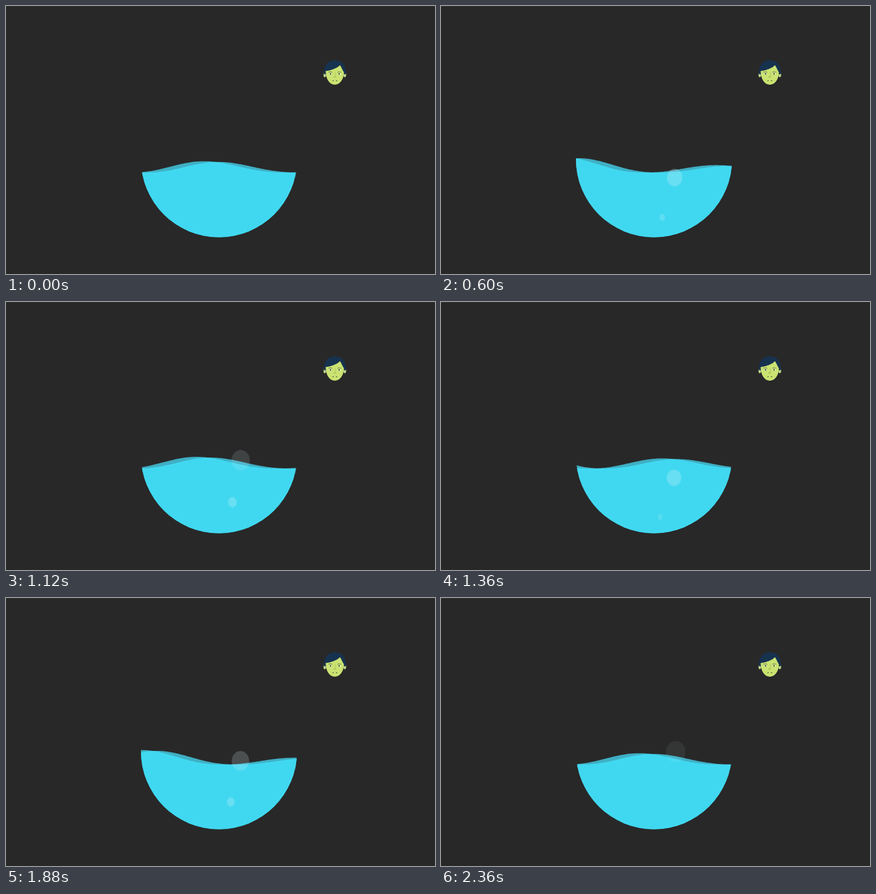
An HTML page with a canvas that plays this animation: 658x412 px, repeating every 2400 ms.

```html
<!DOCTYPE html>
<html lang="en">
<head>
<meta charset="utf-8">
<title>Water bowl</title>
<style>
html, body { margin: 0; width: 100%; height: 100%; overflow: hidden; background: #282828; }
canvas { display: block; }
</style>
</head>
<body>
<canvas id="stage" width="658" height="412"></canvas>
<script>
const ctx = document.getElementById('stage').getContext('2d');
const TAU = Math.PI * 2;
const LOOP = 2400, STEP = 40;
const BOWL = { x: 326.7, y: 235.8, r: 119.7 };
const WAVE = { length: 238, period: 1180, trough: 255.9 };
const BUBBLE_GAP = 400, BUBBLE_COUNT = 5, BUBBLE_LIFE = 800;

function surface(x, crest) {
  const height = 22.3 - 0.05 * (x - 207);
  const lift = (1 + Math.cos(TAU * (x - crest) / WAVE.length)) / 2;
  return WAVE.trough - height * Math.pow(lift, 1.2);
}

function wavePath(crest) {
  const path = new Path2D();
  path.moveTo(200, 360);
  for (let x = 200; x <= 454; x += 2) path.lineTo(x, surface(x, crest));
  path.lineTo(454, 360);
  path.closePath();
  return path;
}

function drawWater(t) {
  const crest = 322 + WAVE.length * t / WAVE.period;
  const waves = [wavePath(crest - 11), wavePath(crest + 11)];
  const both = new Path2D();
  both.addPath(waves[0]);
  both.addPath(waves[1]);
  ctx.save();
  ctx.beginPath();
  ctx.arc(BOWL.x, BOWL.y, BOWL.r, 0, TAU);
  ctx.clip();
  ctx.fillStyle = '#3fafc4';
  ctx.fill(both, 'nonzero');
  ctx.clip(waves[0]);
  ctx.fillStyle = '#40d8f0';
  ctx.fill(waves[1]);
  ctx.restore();
}

function drawBubble(age) {
  if (age <= 0 || age >= BUBBLE_LIFE) return;
  const x = 360 - 38 * Math.pow(1 - age / 760, 2);
  const y = 351.9 - 0.128 * age - 0.0000315 * age * age;
  const r = 0.6 + 0.0188 * age;
  const alpha = Math.min(0.25, age * 0.0009, (BUBBLE_LIFE - age) * 0.0016);
  fillEllipse(x, y, r, r * 1.05 + 1, `rgba(222,245,250,${alpha})`);
}

function fillEllipse(x, y, rx, ry, color) {
  ctx.fillStyle = color;
  ctx.beginPath();
  ctx.ellipse(x, y, rx, ry, 0, 0, TAU);
  ctx.fill();
}

function fillShape(d, color) {
  ctx.fillStyle = color;
  ctx.fill(new Path2D(d));
}

function strokeShape(d, color, width) {
  ctx.strokeStyle = color;
  ctx.lineWidth = width;
  ctx.stroke(new Path2D(d));
}

// Coordinates are relative to the middle of the face.
function drawHead() {
  ctx.save();
  ctx.translate(504.3, 103);
  for (const side of [-1, 1]) fillEllipse(side * 15.4, 3, 1.9, 3.6, '#c3d78c');
  fillShape('M-16.5 2C-18-9-12-19-1-19.5C11-20 18-11 16.5 2Z', '#17324f');
  fillShape('M-14 -3C-6-4 3-7 8-12C10-9 12-4 14-1C14 9 8 18 0 18C-8 18-14 9-14-3Z', '#cbe372');
  for (const side of [-1, 1]) {
    fillEllipse(side * 6.8, 1.2, 2.7, 1.4, '#e6efc5');
    fillEllipse(side * 6.6, 1.2, 1.1, 1.2, '#35503f');
    strokeShape(`M${side * 3.8} -1.2Q${side * 7} -2.6 ${side * 10.2} -1`, '#71883f', 1);
    strokeShape(`M${side * 1.7} 12.2Q${side * 2.9} 11 ${side * 3.6} 12.3`, '#526d3c', 1.2);
  }
  strokeShape('M0.5 -1L1 5.5', '#b0c85c', 1);
  strokeShape('M-2.2 5.8Q0 7 2.2 5.8', '#9bb34f', 1);
  ctx.restore();
}

function draw(now) {
  const t = Math.floor(now % LOOP / STEP) * STEP;
  ctx.fillStyle = '#282828';
  ctx.fillRect(0, 0, 658, 412);
  ctx.fillStyle = '#303030';
  ctx.fillRect(0, 0, 658, 1);
  drawWater(t);
  for (let i = 0; i < BUBBLE_COUNT; i++) drawBubble(t - i * BUBBLE_GAP);
  drawHead();
}

const start = performance.now();
function tick() {
  draw(performance.now() - start);
  requestAnimationFrame(tick);
}
tick();
</script>
</body>
</html>
```
